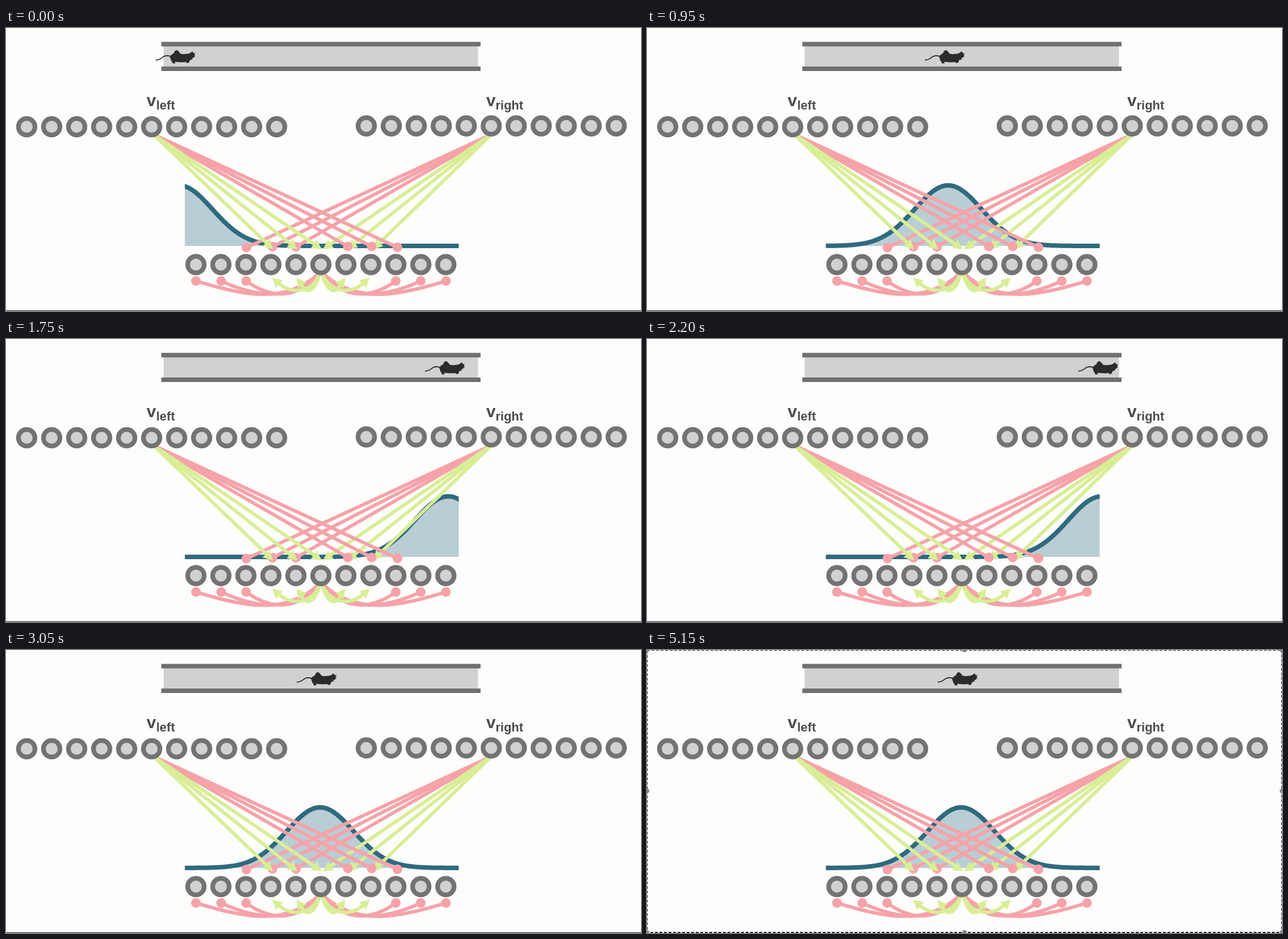
These frames come from a looping animation (1120 px wide and 500 px high, 5200 ms). An HTML page:

```html
<!DOCTYPE html>
<html lang="en">
<head>
<meta charset="utf-8">
<title>Ring of cells tracking a mouse</title>
<style>
  html, body { margin: 0; width: 100%; height: 100%; overflow: hidden; background: #fdfdfb; }
  svg { display: block; width: 1120px; height: 500px; }
  text { font: bold 30px "Liberation Sans", Arial, sans-serif; fill: #4c4c4c; }
  .sub { font-size: 22px; }
  .cell { fill: #d1d1d1; stroke: #737373; stroke-width: 8.2; }
  .wire { fill: none; stroke-width: 6; }
  .pink.wire { stroke: #f6a2a9; }
  .green.wire { stroke: #d8ee96; }
  .pink.tip { fill: #f6a2a9; }
  .green.tip { fill: #d8ee96; }
  .ant { fill: none; stroke: #222; stroke-width: 2; stroke-dasharray: 5 3; }
</style>
</head>
<body>
<svg viewBox="0 0 1120 500">
  <defs><clipPath id="plot"><rect x="315.5" y="260" width="483" height="140"/></clipPath></defs>
  <rect width="1120" height="500" fill="#fdfdfb"/>

  <rect x="278" y="30" width="554.5" height="40" fill="#d1d1d1"/>
  <path d="M274 28.5H837M274 72H837" stroke="#707070" stroke-width="8"/>

  <g id="mouse">
    <path d="M0 56.5C6 57.5 10 53 14 50.5S22 49 29 50.5" fill="none" stroke="#2b2b2b" stroke-width="1.8"/>
    <path d="M25 51C27 47 30 46 32 44.5C33 41 35 38.500 38 39.500C41 41 42 44 44 45.500C49 47 54 45.500 58 45.500C60 44.500 61 43.500 62 44L63 42L65 41.500L66 43.500C69 44 70 46 69 49C69 51 67 52.500 64 53.500L65 56L61 56L58.500 61.500L54 61.800L54 60C48 61 40 60.500 34 59.500L34.500 62.500L30 62.500L29 60L27.500 58Z" fill="#2b2b2b"/>
    <path d="M67 45L71 43M68 47L71 51" stroke="#8a8a8a" stroke-width=".8"/>
  </g>

  <text x="248" y="138">v</text><text class="sub" x="265" y="144">left</text>
  <text x="847" y="138">v</text><text class="sub" x="863.500" y="144">right</text>

  <g clip-path="url(#plot)">
    <g id="bump">
      <path id="area" fill="#b9cdd4"/>
      <path id="curve" fill="none" stroke="#2f6a7f" stroke-width="8"/>
    </g>
  </g>
  <g id="net"></g>
  <path d="M0 499.200H1120" stroke="#5c5c5c" stroke-width="1.6"/>
  <g id="frame">
    <path d="M0 499H1120" stroke="#fdfdfb" stroke-width="3"/>
    <rect class="ant" x="0" y="0" width="1120" height="499"/>
  </g>
</svg>
<script>
const $ = id => document.getElementById(id);
const LOOP = 5200, STEP = 50, START = 264, FAR = 762, MID = 513;

function add(parent, tag, attrs) {
  const el = document.createElementNS('http://www.w3.org/2000/svg', tag);
  for (const k in attrs) el.setAttribute(k, attrs[k]);
  parent.appendChild(el);
}

const net = $('net');
const wire = (color, d) => add(net, 'path', { class: color + ' wire', d });
const dot = (x, y) => add(net, 'circle', { class: 'pink tip', cx: x, cy: y, r: 8.5 });

function head(x, y, angle) {
  add(net, 'path', {
    class: 'green tip', d: 'M0 0L-17 -9V9Z',
    transform: `translate(${x} ${y}) rotate(${angle * 180 / Math.PI})`
  });
}

function arrow(x0, y0, x, y) {
  const a = Math.atan2(y - y0, x - x0);
  wire('green', `M${x0} ${y0}L${x - 12 * Math.cos(a)} ${y - 12 * Math.sin(a)}`);
  head(x, y, a);
}

function fan(x, y, dots, tips) {
  for (const [dx, dy] of dots) {
    wire('pink', `M${x} ${y}L${dx} ${dy}`);
    dot(dx, dy);
  }
  for (const tx of tips) arrow(x, y, tx, 391);
}

function row(x, y) {
  for (let i = 0; i < 11; i++) add(net, 'circle', { class: 'cell', cx: x + 44.08 * i, cy: y, r: 14.6 });
}

// Recurrent links below the middle cell; side is -1 or 1.
function loops(side) {
  const c = 555.5, px = d => c + side * d;
  for (const [end, a, ay, b] of [[220.5, 136, 472, 65], [176, 126, 470, 55], [132, 100, 470, 50]]) {
    wire('pink', `M${px(end)} 447C${px(a)} ${ay} ${px(b)} 489 ${px(4)} 434`);
    dot(px(end), 447);
  }
  for (const [end, a, b] of [[86, 52, 17], [43, 27, 11]]) {
    const tx = px(end), ty = 441, ang = Math.atan2(-18, side * (end > 50 ? 20 : 13));
    const bx = tx - 12 * Math.cos(ang), by = ty - 12 * Math.sin(ang);
    wire('green', `M${px(2)} 434C${px(b)} 468 ${px(a)} 472 ${bx} ${by}`);
    head(tx, ty, ang);
  }
}

fan(856, 188, [[424, 388], [470, 386.5], [511.5, 386.5]], [559, 602, 647]);
fan(260, 188, [[603, 386], [645, 386], [690.5, 387.5]], [471, 514, 557]);
loops(-1);
loops(1);
row(36.5, 174.5);
row(635.5, 173);
row(335, 418);

let line = '';
for (let x = -560; x <= 560; x += 4) {
  line += `${line ? 'L' : 'M'}${x} ${(385 - 107 * Math.exp(-x * x / (2 * 59 * 59))).toFixed(2)}`;
}
$('curve').setAttribute('d', line);
$('area').setAttribute('d', line + 'Z');

for (const x of [0, 560, 1120]) {
  for (const y of [0, 249, 499]) {
    if (x !== 560 || y !== 249) add($('frame'), 'circle', { cx: x, cy: y, r: 4, fill: '#858585' });
  }
}

// Steady run with a ramp of length a at both ends.
function glide(t, T, a) {
  if (t <= 0) return 0;
  if (t >= T) return 1;
  const v = 1 / (T - a);
  if (t < a) return v * t * t / (2 * a);
  if (t < T - a) return v * (t - a / 2);
  return 1 - v * (T - t) ** 2 / (2 * a);
}

function draw(now) {
  const t = Math.floor(now % LOOP / STEP) * STEP;
  const x = START + (FAR - START) * glide(t - 65, 1912, 362) + (MID - FAR) * glide(t - 2160, 890, 250);
  $('mouse').setAttribute('transform', `translate(${x.toFixed(2)} 0)`);
  $('bump').setAttribute('transform', `translate(${(x + 41).toFixed(2)} 0)`);
  $('frame').style.display = t >= 4150 ? '' : 'none';
}

const begin = performance.now();
function tick() {
  draw(performance.now() - begin);
  requestAnimationFrame(tick);
}
tick();
</script>
</body>
</html>
```
